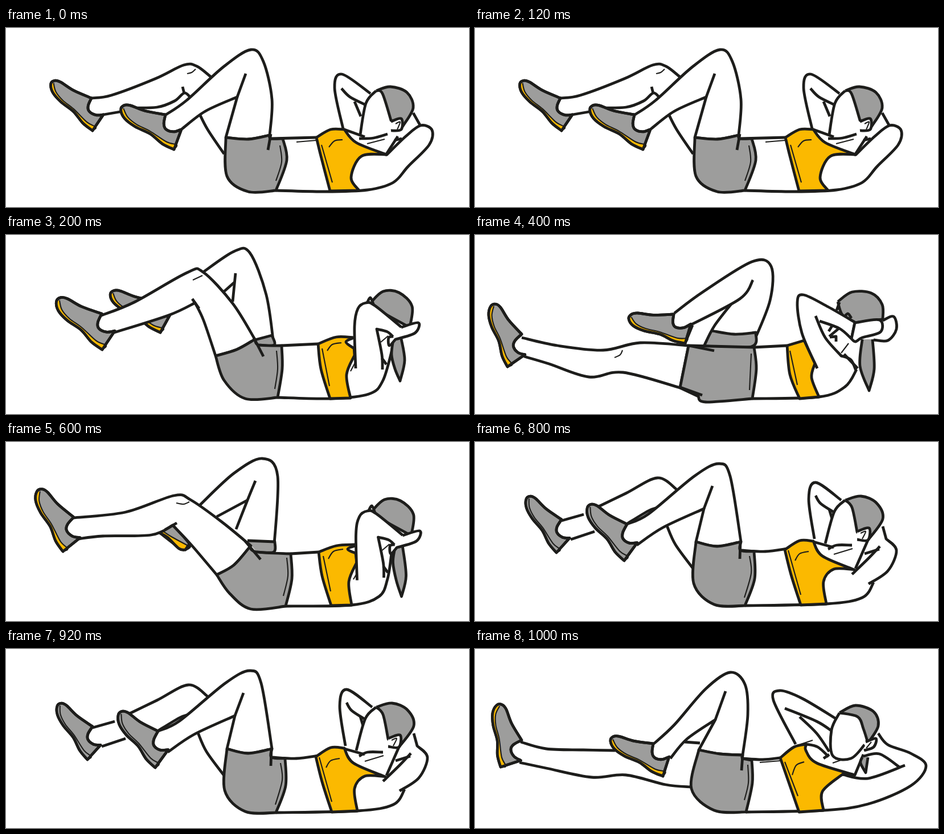
These frames come from a looping animation (813 by 314 pixels, 1.2 s). An HTML page with a canvas:

```html
<!DOCTYPE html>
<html lang="en">
<head>
<meta charset="utf-8">
<title>Bicycle crunch</title>
<style>
html, body { margin: 0; height: 100%; overflow: hidden; background: #fff; }
canvas { display: block; width: 100vw; height: 100vh; }
</style>
</head>
<body>
<canvas id="stage" width="813" height="314"></canvas>
<script>
const INK = '#1d1d1b', GREY = '#9d9d9c', GOLD = '#fbb900';
const ctx = document.getElementById('stage').getContext('2d');
ctx.strokeStyle = INK;
ctx.lineJoin = 'round';

const points = text => text.trim().split(/\s+/).map(s => s.split(',').map(Number));

// Smooth curve through the points; "|" makes a corner
function curve(text, map = p => p) {
  const path = new Path2D();
  let last;
  for (const run of text.split('|')) {
    const p = points(run).map(map);
    if (last) p.unshift(last);
    else path.moveTo(...p[0]);
    for (let i = 0; i + 1 < p.length; i++) {
      const b = p[i], c = p[i + 1], a = p[i - 1] || b, d = p[i + 2] || c;
      path.bezierCurveTo(
        b[0] + (c[0] - a[0]) / 6, b[1] + (c[1] - a[1]) / 6,
        c[0] - (d[0] - b[0]) / 6, c[1] - (d[1] - b[1]) / 6, ...c);
    }
    last = p[p.length - 1];
  }
  return path;
}

function paint(path, fill, width = 4.8) {
  if (fill) { ctx.fillStyle = fill; ctx.fill(path); }
  ctx.lineWidth = width;
  ctx.stroke(path);
}

const line = text => paint(curve(text));
const thin = text => paint(curve(text), null, 2.1);
const white = text => paint(curve(text), '#fff');
const grey = text => paint(curve(text), GREY);
const gold = text => paint(curve(text), GOLD);

// Shoe in axes toe-to-heel and toe-to-ankle
const UPPER = '.36,.93 .47,.63 .44,.49 .28,.63 0,1|-.01,.56 -.1,.33 -.07,.15 ';
const SOLE = '.08,-.1 .32,-.3 .51,-.29 .65,-.12 .89,-.13 1,0';
const SEAM = '|.85,.24 .81,.06 .57,-.03 .44,-.17 .26,-.16 .02,.03';

function shoe(anchors, sole = GOLD) {
  const [toe, heel, ankle] = points(anchors);
  const map = ([u, v]) => toe.map((t, k) => t + u * (heel[k] - t) + v * (ankle[k] - t));
  const outline = curve(UPPER + SOLE, map), band = curve(SOLE + SEAM, map);
  outline.closePath();
  paint(outline, GREY);
  paint(band, sole, 2.1);
  paint(outline);
}

// Head and raised arm while turned away; drop lowers arm and hair
function turnedHead(drop) {
  grey(`680,${183 + drop / 4} 677,210 683,${235 + drop / 2} 692,${256 + drop}|700,${220 + drop} 694,182`);
  grey('640,119 662,99 690,101 713,125 709,162|660,135 640,119');
  white('634,119 640,110 646,124');
  white(`614,${234 + drop / 2} 612,160 618,129 632,119 648,124 697,164`);
  line('661,236 660,210 651,165|670,170 683,182');
  line('660,216 668,227');
  thin('658,188 671,177');
  white('694,162 724,154 718,172 684,183|673,194 672,180 680,178');
}

const poses = [
  () => {
    line('338,147 354,178 383,221');
    line('360,86 335,67 312,65 262,89 185,118 150,123');
    line('171,152 206,146');
    line('215,140 265,139 296,128 313,114 324,122');
    line('310,103 313,115');
    thin('318,80 326,78 333,72');
    shoe('80,94 152,180 150,123');
    white('281,152 317,127 382,68 430,38 452,59 467,125 463,188|426,195 386,192|406,121|350,146 309,177');
    line('406,121 421,80');
    shoe('202,139 295,213 280,152');
    line('474,285 560,287 635,284 680,271 706,243 743,205 748,179 728,171 702,190 668,223');
    grey('386,192 426,195 463,188|465,194 486,194|493,232 474,285|425,287 388,260 386,192');
    line('465,186 460,214');
    thin('481,206 484,235 474,268');
    line('465,194 545,192');
    thin('510,200 545,197');
    gold('545,192 553,225 569,286|620,285|606,262 624,225 668,222|615,201 594,178|570,178 545,192');
    thin('554,205 573,271');
    thin('567,209 577,198 591,196');
    line('592,177 577,105 590,81 640,115');
    line('589,106 604,121 632,135');
    line('612,129 623,155');
    line('715,149 728,172');
    line('682,197 695,194');
    line('666,224 688,190');
    white('650,110 632,132 622,187');
    grey('650,110 675,103 704,113 715,140 697,172|676,162|661,115 650,110');
    white('676,164 694,159 694,178 676,180');
    thin('684,168 692,165 687,178');
    line('594,178 630,191');
    line('620,194 645,193 670,186');
    thin('634,203 665,195');
  },
  () => {
    shoe('184,100 271,171 262,116');
    line('345,66 400,29 428,31 457,105 470,192');
    line('403,67 398,117');
    line('383,99 401,83');
    grey('437,184 467,176|471,193 445,193');
    white('165,142 225,118 318,66 346,65 398,120 437,183|405,201 368,212|347,150 332,119|285,141 187,172');
    line('327,112 339,129');
    thin('328,79 345,71');
    shoe('90,112 169,201 168,138');
    line('477,285 570,287 637,279 662,255 680,193');
    grey('368,212 405,201 437,183|444,193 484,194|485,235 477,285|420,287 383,255 368,212');
    line('435,180 452,213');
    thin('475,203 477,235 472,270');
    line('484,194 548,191');
    gold('548,191 553,235 569,287|605,286|598,245 612,211|610,180|580,179 548,191');
    thin('555,199 568,265');
    thin('564,203 573,192 589,189');
    white('611,180 597,188 613,200');
    thin('605,239 614,222');
    turnedHead(0);
  },
  () => {
    line('378,158 465,112 488,79');
    line('350,137 400,100 486,47 520,55 518,115 487,193');
    grey('416,168 455,174 493,171|485,196 402,195');
    line('450,121 420,160 402,195');
    line('368,192 382,158');
    shoe('270,143 369,190 349,139');
    white('82,180 145,194 225,202 290,189 375,194|360,268|260,241 200,249 130,226 86,213');
    thin('259,202 255,210 245,215');
    shoe('31,121 57,231 82,174');
    line('487,287 604,284 650,266 670,236');
    grey('375,194 490,197|494,235 487,287|405,293 392,283|360,268|375,194');
    line('375,194 420,203');
    line('360,267 399,281');
    thin('485,208 482,272');
    line('490,197 548,194');
    gold('548,194 553,245 570,287|604,284|591,250 597,225|578,185|548,194');
    thin('553,203 566,263');
    white('700,184 725,185 740,165 735,143 716,150');
    grey('680,183 676,230 692,273|701,235 698,183');
    grey('637,117 662,100 696,102 715,122 716,148|667,154|645,140 637,117');
    line('649,143 655,138 661,146');
    gold('703,150 714,148');
    line('640,118 635,132');
    white('601,234 574,172 566,118 577,105 620,126 667,153|661,182|640,164 605,151');
    line('598,142 615,180 644,213');
    line('621,169 628,158');
    line('622,178 640,163');
    line('623,179 634,178|634,187');
    thin('643,207 656,190');
    line('643,212 660,219 669,238');
    line('648,209 672,234');
    white('661,182 667,154|710,149 712,170 680,180 668,187 661,182');
  },
  () => {
    grey('265,157 283,167 304,187 315,189|322,179 293,146');
    paint(curve('275,156 292,167 318,181|315,189 304,187 265,157'), GOLD, 2.1);
    line('265,157 283,167 304,187 315,189|322,179');
    line('340,111 400,55 450,29 477,60 470,192');
    line('438,68 424,102 404,153');
    line('370,131 424,102');
    grey('424,173 472,175|470,193 440,193');
    white('118,133 210,123 295,94 325,102 380,141 430,182|400,216 370,233|325,180 293,146|255,163 170,165 127,170');
    line('279,154 300,142');
    thin('299,107 312,109 322,105');
    shoe('57,83 100,192 119,132');
    line('491,288 607,286 655,271 670,240 677,195');
    grey('370,233 400,216 428,184|440,193 500,196|502,240 491,288|430,293 393,266 370,233');
    line('420,174 447,206');
    thin('493,203 495,235 487,270');
    line('500,196 549,193');
    gold('549,193 555,235 571,287|607,286|602,245 616,211|612,180|580,182 549,193');
    thin('557,200 570,262');
    thin('566,205 575,192 592,188');
    white('617,181 600,188 617,196');
    thin('610,241 617,229');
    ctx.save();
    ctx.translate(2.5, 2);
    turnedHead(13);
    ctx.restore();
  },
  () => {
    line('337,147 352,180 383,222');
    line('354,83 320,63 265,90 205,119');
    line('152,138 191,127');
    line('168,171 210,157');
    line('266,144 304,121 320,115');
    shoe('92,96 143,194 152,136', GREY);
    white('267,144 305,126 385,60 428,38 448,60 467,175|425,183 388,175|402,117|330,150 284,181');
    line('402,117 417,77');
    shoe('199,111 262,208 267,144', GREY);
    line('474,287 617,284 680,273 700,246');
    grey('388,175 425,183 467,175|466,190 490,192|491,240 474,287|420,285 384,248 388,175');
    line('466,175 465,205');
    thin('482,200 485,230 473,273');
    line('468,190 510,192 549,187');
    gold('544,189 555,233 572,286|617,284|612,245 630,223 666,224|610,200 594,174|570,173 544,189');
    thin('550,190 572,268');
    thin('562,208 570,196 586,192');
    line('596,170 586,100 598,71 643,102');
    line('598,94 607,108 630,123');
    line('622,118 628,138');
    line('716,148 722,170|740,190 725,226 691,249');
    line('711,183 690,205 662,232');
    line('684,196 710,188');
    line('668,222 690,172');
    white('650,102 631,122 615,178');
    grey('650,102 678,95 705,107 716,135 690,172|671,158|662,115 650,102');
    white('671,157 692,151 690,172 671,171');
    thin('677,160 686,157 680,170');
    line('594,175 630,185');
    line('620,188 635,181 662,181');
    thin('630,197 663,187');
  },
  () => {
    line('80,163 125,175 190,177 246,178');
    line('368,163 395,165');
    line('78,199 125,209 205,225 265,221 335,238 380,242');
    shoe('42,96 45,207 82,160');
    white('313,167 350,133 405,70 448,41 474,62 479,115 470,186|430,184 393,177|422,124|372,158 343,192');
    line('422,124 440,74');
    shoe('238,157 330,223 313,166');
    line('476,286 612,283 690,272 765,240 792,205 765,183 725,168 708,148');
    grey('393,177 430,184 470,186|470,192 486,195|487,235 476,286|420,283 380,245 393,177');
    line('470,186 468,213');
    thin('479,203 480,235 473,265');
    line('470,192 505,194 536,191');
    thin('500,199 536,196');
    line('563,167 524,90 535,73 575,87 635,123');
    line('544,104 600,127 628,145');
    line('570,119 600,148 622,180');
    gold('536,191 569,286|612,283|610,250 645,220|667,221|600,200 581,178 582,167|560,172 536,191');
    thin('544,198 567,258');
    thin('557,221 564,204 578,198');
    thin('572,167 593,160');
    line('645,220 690,227 755,204');
    line('680,189 710,184 745,207');
    line('667,221 682,185');
    grey('680,190 677,200 686,217|690,190');
    line('582,167 602,172 621,189');
    line('612,192 622,185');
    thin('628,200 648,193');
    white('640,112 626,142 628,187 660,192 684,168');
    grey('640,112 668,99 700,110 708,135 690,165|682,140 672,119 640,112');
    white('686,163 704,157 700,172 683,178');
    thin('687,174 696,163');
  }
];

const start = performance.now();
function draw() {
  const now = Math.max(0, performance.now() - start);
  ctx.clearRect(0, 0, 813, 314);
  poses[Math.floor(now / 200) % poses.length]();
  requestAnimationFrame(draw);
}
draw();
</script>
</body>
</html>
```
